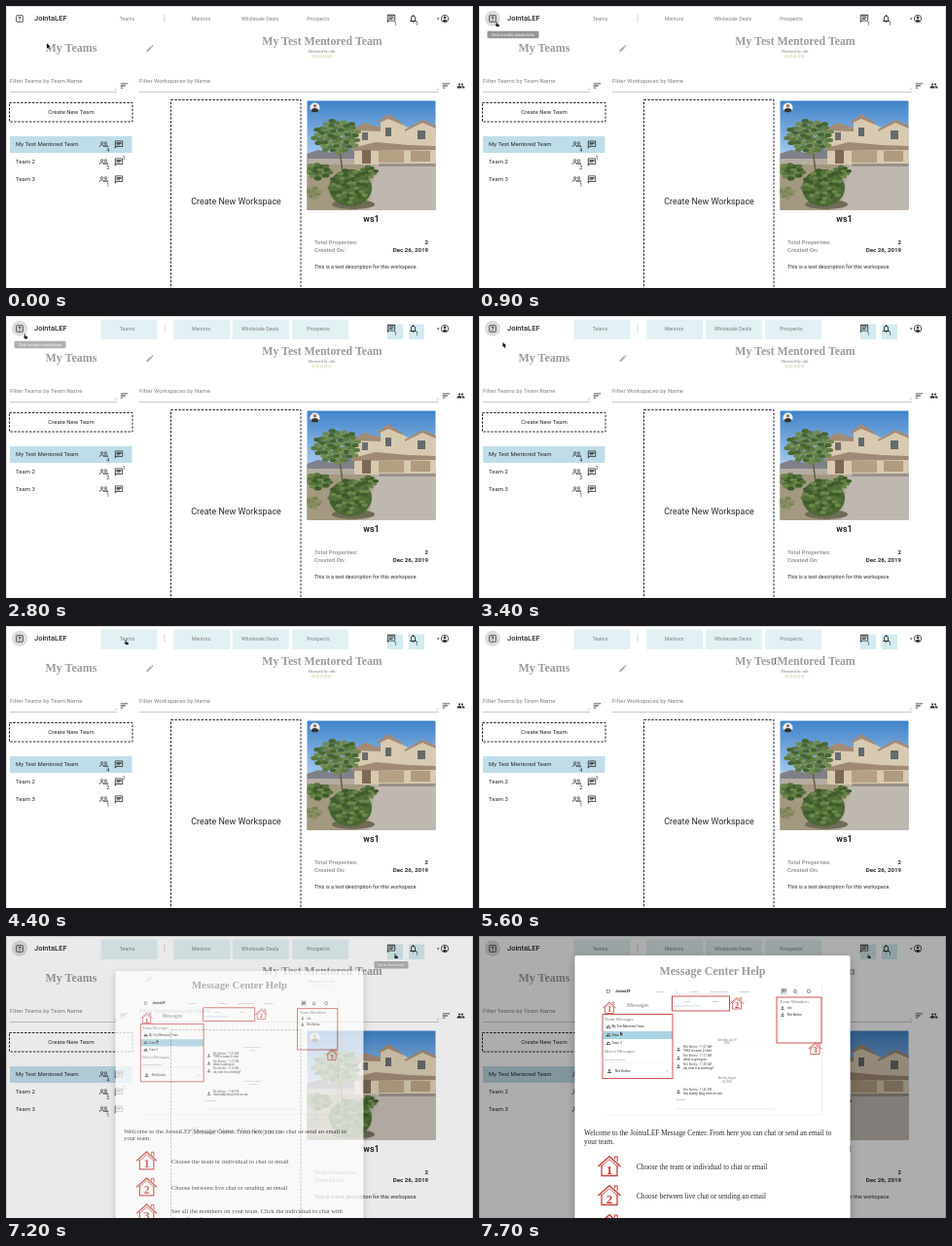
These frames come from a looping animation (480 px wide and 290 px high, 8000 ms). An HTML page:

```html
<!DOCTYPE html>
<html lang="en">
<head>
<meta charset="utf-8">
<title>Team workspace help</title>
<style>
html, body { margin: 0; width: 100%; height: 100%; overflow: hidden; background: #fff; }
svg { display: block; width: 100vw; height: 100vh; }
text { font-family: Roboto, Arial, sans-serif; white-space: pre; }
.serif { font-family: "Liberation Serif", Times, serif; }
</style>
</head>
<body>
<svg id="stage" viewBox="0 0 480 290" preserveAspectRatio="none"></svg>
<script>
const LOOP = 8000, STEP = 100;
const APP = "JointaLEF", USER = "nils", MEMBER = "Nils Barlow";
const INK = "#2b2b2b", GREY = "#808080", TITLE = "#9c9c9c", RED = "#c5433d";

const ICONS = {
  chat: "M4 4h16v12H5.2L4 17.2V4m0-2c-1.1 0-2 .9-2 2v18l4-4h14c1.1 0 2-.9 2-2V4c0-1.1-.9-2-2-2H4zm2 10h9v1.500H6v-1.500zm0-3h12v1.500H6V9zm0-3h12v1.500H6V6z",
  bell: "M12 22c1.1 0 2-.9 2-2h-4c0 1.1.9 2 2 2zm6-6v-5c0-3.1-1.6-5.6-4.5-6.3V4c0-.8-.7-1.5-1.5-1.5s-1.5.7-1.5 1.5v.7C7.6 5.4 6 7.9 6 11v5l-2 2v1h16v-1l-2-2zm-2 1H8v-6c0-2.5 1.5-4.5 4-4.5s4 2 4 4.5v6z",
  sort: "M3 18h6v-2H3v2zM3 6v2h18V6H3zm0 7h12v-2H3v2z",
  edit: "M3 17.2V21h3.8L17.8 9.9l-3.7-3.7L3 17.2zM20.7 7c.4-.4.4-1 0-1.4l-2.3-2.3c-.4-.4-1-.4-1.4 0l-1.9 1.8 3.8 3.8L20.7 7z",
  person: "M12 12a4 4 0 1 0 0-8 4 4 0 0 0 0 8zm0 2c-3 0-8 1.300-8 4v2h16v-2c0-2.700-5-4-8-4z",
  people: "M16 11a3 3 0 1 0 0-6 3 3 0 0 0 0 6zm-8 0a3 3 0 1 0 0-6 3 3 0 0 0 0 6zm0 2c-2.300 0-7 1.200-7 3.500V19h14v-2.500C15 14.200 10.300 13 8 13zm8 0-1 .1c1.200.8 2 1.900 2 3.400V19h6v-2.500c0-2.300-4.700-3.500-7-3.500z"
};

// Markup helpers
const rect = (x, y, w, h, fill, more = "") =>
  `<rect x="${x}" y="${y}" width="${w}" height="${h}" fill="${fill}" ${more}/>`;
const frame = (x, y, w, h, color, width, more = "") =>
  rect(x, y, w, h, "none", `stroke="${color}" stroke-width="${width}" ${more}`);
const line = (x1, y1, x2, y2, color, width = 0.5) =>
  `<path d="M${x1} ${y1}L${x2} ${y2}" stroke="${color}" stroke-width="${width}"/>`;
const circle = (x, y, r, fill, more = "") =>
  `<circle cx="${x}" cy="${y}" r="${r}" fill="${fill}" ${more}/>`;
const oval = (x, y, rx, ry, fill) =>
  `<ellipse cx="${x}" cy="${y}" rx="${rx}" ry="${ry}" fill="${fill}"/>`;
const shape = (d, fill, more = "") => `<path d="${d}" fill="${fill}" ${more}/>`;
const text = (x, y, size, str, fill = INK, more = "") =>
  `<text x="${x}" y="${y}" font-size="${size}" fill="${fill}" ${more}>${str}</text>`;
const mid = 'text-anchor="middle" ', end = 'text-anchor="end" ';
const bold = 'font-weight="700" ', serif = 'class="serif" ';
const heading = (x, y, size, str, more = mid) =>
  text(x, y, size, str, TITLE, serif + bold + more);
const group = (id, body, more = "") => `<g id="${id}" ${more}>${body}</g>`;
const icon = (name, cx, cy, size = 10, fill = INK) =>
  `<path d="${ICONS[name]}" fill="${fill}" transform="translate(${cx - size / 2} ${cy - size / 2}) scale(${size / 24})"/>`;
const pair = (x, y) =>
  `<g transform="translate(${x} ${y})" fill="none" stroke="${INK}" stroke-width=".7">
   <circle cx="-1.900" cy="-1.500" r="1.150"/><circle cx="1.900" cy="-1.500" r="1.150"/>
   <path d="M-4.200 2.600V1.700C-4.200.2 0 .2 0 1.700v.9M0 1.700C.4.3 4.200.3 4.200 1.700v.9z"/></g>`;

function house(x, y, scale, number) {
  return `<g transform="translate(${x} ${y}) scale(${scale})" stroke="${RED}" fill="none">
    <path d="M-8-1.500V9.500H8V-1.500" stroke-width="1.300" fill="#fff"/>
    <path d="M5.500-7.500v-2.500h2.700v5" stroke-width="1.100"/>
    <path d="M-11.500 0L0-10.300 11.500 0" stroke-width="1.500"/>
    <path d="M-8.500.2L0-7.300 8.500.2" stroke-width=".9"/>
    ${text(0, 7.500, 13, number, RED, serif + bold + mid + 'stroke="none"')}</g>`;
}

// A round clump of leaves, spread along a spiral
function foliage(cx, cy, rx, ry, count, leaf, tones) {
  let out = "";
  for (let i = 0; i < count; i++) {
    const a = i * 2.4, r = Math.sqrt(i / count);
    out += oval(cx + rx * r * Math.cos(a), cy + ry * r * Math.sin(a), leaf, leaf * 0.6, tones[i % tones.length]);
  }
  return out;
}

function photo() {
  const leaf = ["#5d7a41", "#48642f", "#718a4f"], hedge = ["#54713a", "#3f5a2c", "#6b8649"];
  return `<g clip-path="url(#photoClip)">
    ${rect(309, 97, 133, 114, "url(#sky)")}
    ${shape("M309 152l12-4 14 3 16-5 20 6v20h-62z", "#7f8088")}
    ${rect(309, 157, 133, 54, "#b5aca1")}
    ${shape("M309 163h60l-8 48h-52z", "#a39880")}
    ${shape("M358 127h27v-9l9-4 10 6 9 5 16-6 13 5v39h-84z", "#d8cab0")}
    ${shape("M355 128l13-8 17 5v4zM382 119l11-8 14 9v2l-14-6-11 5zM410 127l18-10 14 6v3l-14-6-18 9z", "#a28b77")}
    ${shape("M356 146l24-6 34 3 28 1v4l-86 1z", "#a08a76")}
    ${rect(366, 130, 6, 8, "#6c6d6d")}${rect(390, 125, 6, 9, "#62696c")}${rect(423, 128, 8, 9, "#666b6c")}
    ${rect(383, 149, 26, 12, "#b5a083")}${rect(416, 149, 20, 11, "#b09b7f")}${rect(366, 148, 9, 14, "#7d6954")}
    ${shape("M381 163h61v48h-70z", "#bfb8b0")}${shape("M384 162h58v3h-60z", "#99928a")}
    ${shape("M346 171l-4-31-9-9M343 151l12-16", "none", 'stroke="#6c5d4a" stroke-width="1.600"')}
    ${foliage(340, 134, 24, 17, 54, 3.600, leaf)}
    ${foliage(321, 170, 12, 8, 22, 3.600, hedge)}${foliage(373, 171, 8, 6, 16, 3, hedge)}
    ${foliage(315, 192, 8, 6, 14, 3, ["#7c8356", "#8d8f66"])}
    ${oval(357, 204, 22, 5, "#6f6b57")}${oval(354, 187, 22, 19, "#4a6732")}
    ${foliage(353, 185, 20, 17, 54, 3.200, hedge)}
    </g>${circle(317.500, 104.500, 5, "#eee")}
    ${circle(317.500, 102.800, 1.800, "#9c7965")}
    ${shape("M313.500 108c0-4 8-4 8 0q-4 3-8 0z", "#333")}`;
}

const NAV = [["Teams", 124.500, 97.500], ["Mentors", 200.500, 172.300], ["Wholesale Deals", 261, 232.800], ["Prospects", 321, 294.200]];
const TAB = 58;

function header() {
  const boxes = NAV.map(n => rect(n[2], 3.500, TAB, 20.500, "#e2f1f3")).join("") +
    rect(392, 8.500, 16, 15.500, "#d3ebf1") + rect(414, 8.500, 16, 15.500, "#d3ebf1");
  return group("halo", circle(14, 12.800, 8, "#dcdcdc")) + group("hints", boxes) +
    frame(10.700, 9.700, 6.600, 6.600, INK, 0.8, 'rx=".6"') +
    text(14, 15, 6, "?", INK, mid + bold) +
    text(29, 15.200, 7.500, APP, INK, 'font-weight="500"') +
    NAV.map(n => text(n[1], 14.600, 5.200, n[0], GREY, mid)).join("") +
    line(163, 8.500, 163, 17, "#aaa") +
    icon("chat", 396, 13) + group("badge", text(400, 19.500, 5.500, "1", INK, mid)) +
    icon("bell", 418.500, 13) + text(422.500, 20, 5.500, "1", INK, mid) +
    shape("M442.800 12.500h2.800l-1.400 1.400z", INK) +
    circle(451, 13, 3.700, "none", `stroke="${INK}" stroke-width=".8"`) +
    circle(451, 11.900, 1.300, INK) + shape("M448.500 15.200q2.500-2.400 5 0-2.500 2.200-5 0z", INK);
}

function teamRow(y, name, count, note) {
  return text(10, y + 2.100, 6, name) + pair(100.500, y) +
    text(104.700, y + 7.600, 5.500, count, INK, mid) + icon("chat", 116, y + 0.3) +
    (note ? text(121, y - 2.500, 5.500, note, INK, mid) : "");
}

function filter(x, right, label) {
  return text(x, 79, 6, label, GREY) + line(x, 88.500, right, 88.500, "#a5a5a5", 0.6) +
    line(right - 3, 87, right, 84, "#999", 0.4) + line(right - 1.300, 87, right, 85.700, "#999", 0.4);
}

function page() {
  const dash = 'stroke-dasharray="2.400 1.500"';
  const star = "M0-2L.5-.6 2-.6.8.3 1.200 1.700 0 .9-1.200 1.700-.8.3-2-.6-.5-.6z";
  let stars = "";
  for (let i = 0; i < 5; i++)
    stars += shape(star, "#f3efd6", `stroke="#c9c4a6" stroke-width=".25" transform="translate(${316 + i * 4.200} 51.700)"`);
  return shape("M.5 290V.5h479V290", "none", 'stroke="#dedede"') + header() +
    heading(67, 47, 12, "My Teams") + icon("edit", 148, 43.500, 9.500, "#b0b0b0") +
    heading(325, 40, 11.800, "My Test Mentored Team") +
    heading(324.500, 47.800, 3.700, "Mentored by: " + USER) + stars +
    filter(4, 114, "Filter Teams by Team Name") + icon("sort", 121.500, 82) +
    filter(137, 445, "Filter Workspaces by Name") + icon("sort", 452.500, 82) + icon("people", 467.500, 82, 8.500) +
    frame(3.500, 99.500, 126.500, 19.500, "#222", 1, dash) +
    text(67, 111.200, 6, "Create New Team", INK, mid) +
    rect(4, 134, 125.500, 17, "#bfdde9") +
    teamRow(142.300, "My Test Mentored Team", 4) + teamRow(160.300, "Team 2", 2, 1) + teamRow(178.300, "Team 3", 1) +
    frame(169.500, 96.500, 133.500, 210, "#222", 1, dash) +
    text(236.500, 203.600, 8.950, "Create New Workspace", INK, mid) + photo() +
    text(375.500, 222, 9, "ws1", INK, mid + bold) +
    text(317, 245.200, 6, "Total Properties:", TITLE, bold) + text(434, 245.200, 6, "2", INK, bold + end) +
    text(317, 252.800, 6, "Created On:", TITLE, bold) + text(434, 252.800, 6.150, "Dec 26, 2019", INK, bold + end) +
    text(317, 270.300, 5.400, "This is a test description for this workspace.");
}

// Small screen picture inside the dialog
function preview() {
  const note = (y, time, words) => icon("person", 205, y + 1.500, 5.500, "#555") +
    text(210, y, 2.900, `${MEMBER} - ${time}`, "#555") + text(210, y + 4.200, 3.300, words);
  const row = (y, name) => icon("people", 133, y - 0.8, 5) + text(136.500, y + 0.3, 3.100, name);
  const date = (y, a, b) => text(255, y, 2.600, a, GREY, mid) + text(255, y + 3.500, 2.600, b, GREY, mid);
  return line(127, 184, 352.500, 184, "#e4e4e4") + line(352.500, 52, 352.500, 184, "#ddd") +
    frame(131.500, 55.500, 2.800, 2.800, INK, 0.4) + text(140, 58, 3.500, APP, INK, bold) +
    [["Teams", 186], ["Mentors", 221], ["Wholesale Deals", 247], ["Prospects", 273]]
      .map(n => text(n[1], 58, 2.500, n[0], GREY, mid)).join("") +
    line(203.500, 55, 203.500, 59, "#aaa", 0.3) +
    rect(310, 53, 7, 7.500, "#dcebed") + icon("chat", 313.300, 56.800, 5) + icon("bell", 325, 56.800, 5) +
    text(327, 60, 2.500, "1") + circle(339, 56.800, 1.800, "none", `stroke="${INK}" stroke-width=".5"`) +
    heading(163, 73.300, 5.700, "Messages") +
    text(214, 68, 2.500, "Chat", GREY, mid) + text(243, 68, 2.500, "Email", GREY, mid) +
    line(200, 72, 228, 72, "#8cbdcc", 0.5) +
    heading(129, 86.700, 4.500, "Team Messages", "") +
    rect(127.500, 98, 71.500, 8, "#a9d3e2") +
    row(94, "My Test Mentored Team") + row(102.500, "Team 2") + row(111, "Team 3") +
    heading(129, 120, 4.500, "Direct Messages", "") +
    text(129, 128, 2.500, "Find Team member", GREY) + line(129, 130, 194, 130, "#ccc", 0.3) +
    icon("person", 134, 139, 6, "#555") + text(140, 140, 3.100, MEMBER) +
    shape("M192 138.500h2l-1 1z", GREY) +
    shape("M145 98l0 4.500 1.200-1 .8 1.600.8-.4-.8-1.500h1.500z", INK, 'stroke="#fff" stroke-width=".3"') +
    line(201, 113, 304, 113, "#eee", 0.4) + date(107.500, "Saturday, July 18", "2020") +
    note(115, "11:27 AM", "THIS is team 2 chat") + note(124, "11:27 AM", "what is going on") +
    note(132.500, "11:28 AM", "ok, now it is working?") + date(147, "Monday, August", "24, 2020") +
    note(158.500, "11:46 PM", "hey buddy long time no see.") +
    text(202, 169, 2.500, "message", GREY) + line(202, 178, 305, 178, "#ccc", 0.4) +
    heading(309, 69, 4.500, "Team Members", "") +
    [[74, USER], [81, MEMBER]].map(m => icon("person", 312, m[0], 5, "#555") + text(317, m[0] + 1, 2.900, m[1])).join("") +
    frame(127, 80.500, 72, 66, RED, 0.9) + frame(198.500, 62, 59, 15, RED, 0.9) + frame(306, 63, 46, 47, RED, 0.9) +
    house(134, 74, 0.58, 1) + house(265, 69.500, 0.58, 2) + house(345.500, 116, 0.58, 3);
}

function dialog() {
  const say = (x, y, str) => text(x, y, 7.250, str, INK, serif);
  return rect(98.500, 20, 283, 320, "#fff", 'rx="2" filter="url(#shadow)"') +
    heading(240, 40.300, 12, "Message Center Help") + preview() +
    say(108, 205, `Welcome to the ${APP} Message Center. From here you can chat or send an email to`) +
    say(108, 213.500, "your team.") +
    house(134, 237, 1, 1) + say(162, 240.300, "Choose the team or individual to chat or email") +
    house(134, 267, 1, 2) + say(162, 270, "Choose between live chat or sending an email") +
    house(134, 297, 1, 3) + say(162, 297, "See all the members on your team. Click the individual to chat with") +
    say(162, 305.500, "them directly.");
}

const tip = (id, x, y, w, str) => group(id,
  rect(x, y, w, 7.600, "#646464", 'rx="1"') + text(x + w / 2, y + 5, 3.550, str, "#fff", mid));

const outline = 'stroke="#fff" stroke-width=".6" stroke-linejoin="round" paint-order="stroke"';
const pointers =
  group("arrow", shape("M0 0v7.200l1.700-1.500 1.200 2.700 1.200-.5-1.200-2.600h2.300z", "#000", outline)) +
  group("hand", shape("M-.7.5q.7-1 1.400 0v2.700l2.700.6q.8.2.7 1.200L3.700 7.500H.2L-2 4.700q.1-.9 1.300 0z", "#222", outline)) +
  group("beam", shape("M-1.700-4q1.700 0 1.700 1 0-1 1.700-1M0-3v6.500M-1.700 4.500q1.700 0 1.700-1 0 1 1.700 1", "none", 'stroke="#111" stroke-width=".9"'));

document.getElementById("stage").innerHTML = `<defs>
  <linearGradient id="sky" x1="0" y1="0" x2="0" y2="1">
    <stop offset="0" stop-color="#3f82c9"/><stop offset=".5" stop-color="#a6c9ec"/></linearGradient>
  <clipPath id="photoClip">${rect(309.500, 97.500, 132, 112.500, "#000", 'rx="1"')}</clipPath>
  <filter id="shadow" x="-10%" y="-10%" width="120%" height="120%">
    <feDropShadow dx="0" dy="3" stdDeviation="4" flood-opacity=".3"/></filter></defs>` +
  rect(0, 0, 480, 290, "#fff") + page() +
  group("veil", rect(0, 0, 480, 290, "#000")) + group("dialog", dialog()) +
  tip("helpTip", 8.500, 25.700, 53, "Click to enable detailed help") +
  tip("chatTip", 378.500, 26, 35, "Go to chat rooms") +
  group("cursor", pointers);

const el = {};
document.querySelectorAll("g[id]").forEach(g => el[g.id] = g);

// Pointer stops: time, x, y
const PATH = [[0, 42, 38.500], [300, 42, 38.500], [800, 18, 16], [2700, 18, 16], [3000, 23, 25],
  [3400, 24.500, 27], [4000, 123, 14], [4900, 123, 14], [5600, 304.500, 36], [5800, 308, 36], [6600, 400, 18]];

const clamp = v => Math.max(0, Math.min(1, v));
const ramp = (t, from, to) => clamp((t - from) / (to - from));
const smooth = p => p * p * (3 - 2 * p);
const fade = (g, v) => g.setAttribute("opacity", v);

function pointerAt(t) {
  let i = 0;
  while (i < PATH.length - 2 && t > PATH[i + 1][0]) i++;
  const [a, b] = [PATH[i], PATH[i + 1]], p = smooth(ramp(t, a[0], b[0]));
  return [a[1] + (b[1] - a[1]) * p, a[2] + (b[2] - a[2]) * p];
}

function pointerKind(x, y) {
  const within = (l, t, r, b) => x >= l && x <= r && y >= t && y <= b;
  if (within(262, 30, 388, 44)) return "beam";
  const link = within(6, 5, 22, 21) || within(392, 8, 408, 24) || NAV.some(n => within(n[2], 4, n[2] + TAB, 24));
  return link ? "hand" : "arrow";
}

function draw(t) {
  const [x, y] = pointerAt(t), kind = pointerKind(x, y);
  el.cursor.setAttribute("transform", `translate(${x} ${y}) scale(.7)`);
  for (const k of ["arrow", "hand", "beam"]) fade(el[k], +(k === kind));

  fade(el.halo, +(t >= 700));
  fade(el.hints, +(t >= 2500));
  fade(el.badge, +(t < 6600));
  fade(el.helpTip, ramp(t, 700, 1000) * (1 - ramp(t, 2700, 2900)));
  fade(el.chatTip, ramp(t, 6600, 6900) * (1 - ramp(t, 7100, 7300)));

  const open = 1 - (1 - ramp(t, 7100, 7300)) ** 2;
  const scale = 0.6 + 0.4 * open;
  fade(el.dialog, open);
  el.dialog.setAttribute("transform", `translate(240 180) scale(${scale}) translate(-240 -180)`);
  fade(el.veil, 0.32 * smooth(ramp(t, 7100, 7400)));
}

function tick() {
  const t = performance.now() % LOOP;
  draw(Math.floor(t / STEP) * STEP);
  requestAnimationFrame(tick);
}
tick();
</script>
</body>
</html>
```
